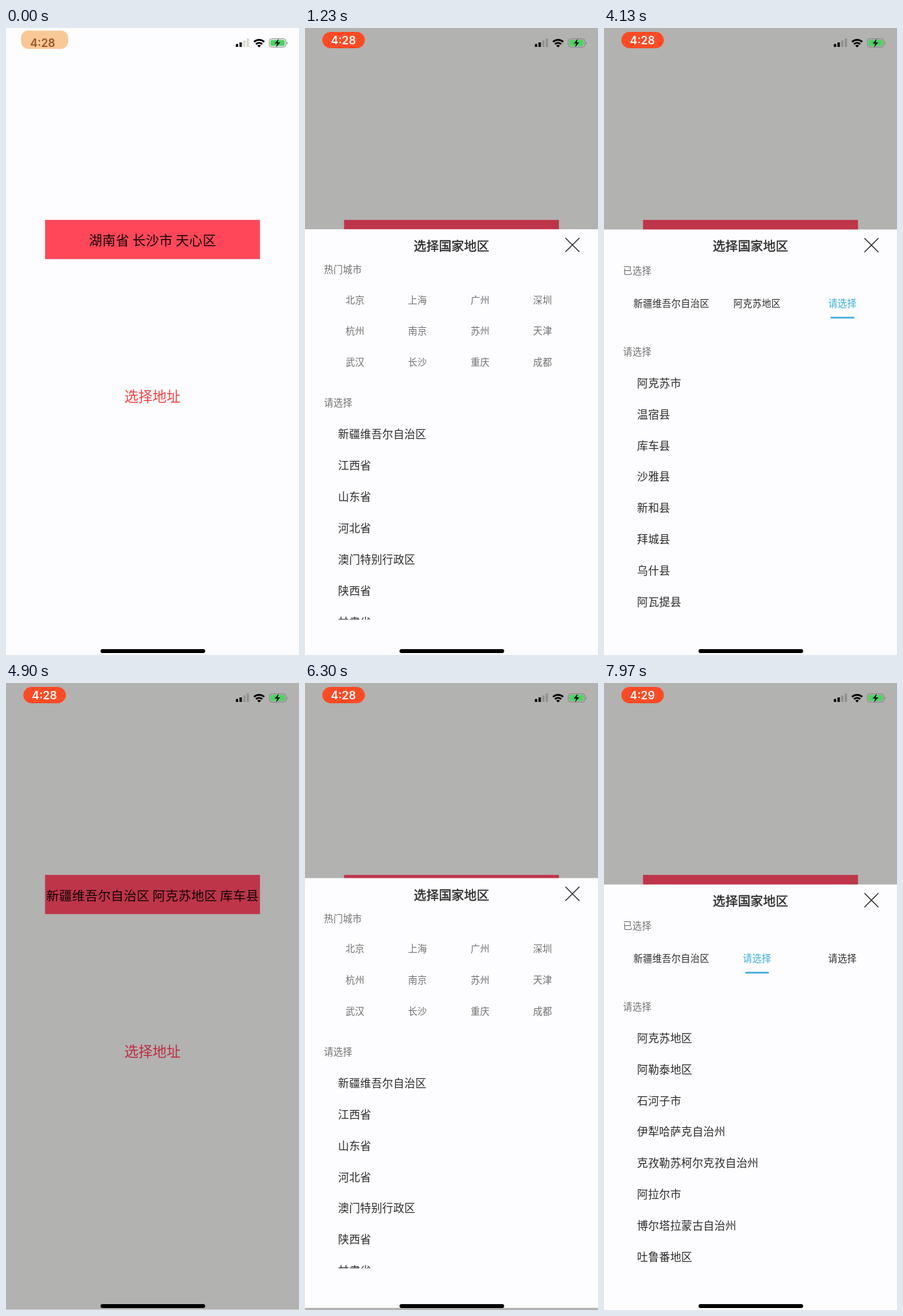
An HTML page for the animation above (8000 ms loop, 448 by 960 pixels).

```html
<!DOCTYPE html>
<html lang="zh-CN">
<head>
<meta charset="utf-8">
<title>选择地址</title>
<style>
  html, body { margin: 0; width: 100%; height: 100%; overflow: hidden; background: #fdfdff; }
  svg { display: block; width: 100vw; height: 100vh; }
  text { font-family: "Noto Sans CJK SC", "Noto Sans CJK", "Noto Sans", sans-serif; }
  #title text { stroke: #2b2b2b; stroke-width: 0.45; }
  #clock { font: 600 17px Inter, sans-serif; }
</style>
</head>
<body>
<svg viewBox="0 0 448 960" xmlns="http://www.w3.org/2000/svg">
  <defs><clipPath id="list"><rect y="309" width="448" height="597"/></clipPath></defs>
  <rect id="bg" width="448" height="960"/>
  <rect id="box" x="59.7" y="293.8" width="328.6" height="60"/>
  <g id="home"></g>
  <g id="sheet">
    <rect y="308.5" width="448" height="658" fill="#fdfdff"/>
    <path d="M398.2 321.8l21.4 21.4m0-21.4l-21.4 21.4" stroke="#2b2b2b" stroke-width="1.5"/>
    <g id="title"></g>
    <g id="provinces" clip-path="url(#list)"></g>
    <g id="cities"></g>
    <g id="districts"></g>
  </g>
  <rect id="pill"/>
  <text id="clock" text-anchor="middle"></text>
  <path d="M351.5 24.5h3.6v4.5h-3.6zM357 22h3.6v7h-3.6z"/>
  <path id="weak" d="M362.6 19h3.6v10h-3.6zM368 16h3.6v13h-3.6z"/>
  <g fill="none" stroke="#000" stroke-width="2.7">
    <path d="M379.2 21.3a11.2 11.2 0 0 1 15.6 0"/>
    <path d="M382.2 24.7a6.9 6.9 0 0 1 9.6 0"/>
  </g>
  <path d="M387 29.8l-2.8-2.8a4 4 0 0 1 5.6 0z"/>
  <rect x="402.5" y="16.5" width="25.5" height="12.8" rx="3.8" fill="none" stroke="#848484"/>
  <path d="M429.4 21v4a2.2 2.2 0 0 0 0-4z" fill="#848484"/>
  <rect x="404.2" y="18.2" width="22.1" height="9.4" rx="2.3" fill="#4bd363"/>
  <path d="M417 16.5l-6.2 7.2h3.8l-1.6 5.8 6.4-7.4h-3.9z"/>
  <rect x="144.5" y="951" width="160" height="6" rx="3"/>
</svg>
<script>
const $ = id => document.getElementById(id);
const LOOP = 8000, TRAVEL = 651;
const INK = '#2b2b2b', SOFT = '#707070', BLUE = '#37ace0';
const TABS = [103, 234, 364.5];

function add(parent, tag, attrs) {
  const el = document.createElementNS('http://www.w3.org/2000/svg', tag);
  set(el, attrs);
  $(parent).append(el);
  return el;
}

// Text placed by the centre height of its glyphs
function label(parent, str, x, cy, size, opt = {}) {
  const el = add(parent, 'text', {
    x, y: cy + size * 0.385, 'font-size': size, fill: opt.fill || INK,
    'text-anchor': opt.anchor || 'start', 'letter-spacing': opt.gap ?? 0.16
  });
  el.textContent = str;
  return el;
}

const small = (parent, str, cy) => label(parent, str, 29, cy, 14.34, { fill: SOFT });
const rows = (parent, names, top) =>
  names.split(' ').forEach((n, i) => label(parent, n, 50.5, top + i * 47.86, 16.73));

function picked(parent, tabs, active, names) {
  small(parent, '已选择', 371);
  tabs.forEach((tab, i) => label(parent, tab, TABS[i], 421.5, 14.34,
    { anchor: 'middle', fill: i === active ? BLUE : INK }));
  add(parent, 'path', {
    d: `M${TABS[active] - 17} 443.5h34`, stroke: BLUE, 'stroke-width': 2.4, 'stroke-linecap': 'round'
  });
  small(parent, '请选择', 495);
  rows(parent, names, 543.4);
}

const clamp = v => Math.min(1, Math.max(0, v));
const ease = p => p * p * (3 - 2 * p);
const mix = (a, b, p) => a + (b - a) * p;
const rgb = (a, b, p) => `rgb(${a.map((v, i) => Math.round(mix(v, b[i], p)))})`;
const show = (el, on) => { el.style.display = on ? '' : 'none'; };
function set(el, attrs) { for (const k in attrs) el.setAttribute(k, attrs[k]); }

const before = label('home', '湖南省 长沙市 天心区', 224, 325, 20.3, { anchor: 'middle', gap: 0.25, fill: '#140606' });
const after = label('home', '新疆维吾尔自治区 阿克苏地区 库车县', 224, 325.5, 19.6, { anchor: 'middle', gap: 0.15, fill: '#100505' });
const link = label('home', '选择地址', 224, 564, 21.5, { anchor: 'middle', gap: 0 });

label('title', '选择国家地区', 224, 334, 19.12, { anchor: 'middle' });
small('provinces', '热门城市', 370);
'北京 上海 广州 深圳 杭州 南京 苏州 天津 武汉 长沙 重庆 成都'.split(' ').forEach((n, i) =>
  label('provinces', n, 76.5 + (i % 4) * 95.6, 416.5 + Math.floor(i / 4) * 47.8, 14.34, { anchor: 'middle', fill: SOFT }));
small('provinces', '请选择', 574);
rows('provinces', '新疆维吾尔自治区 江西省 山东省 河北省 澳门特别行政区 陕西省 甘肃省', 622.4);
picked('cities', ['新疆维吾尔自治区', '请选择', '请选择'], 1,
  '阿克苏地区 阿勒泰地区 石河子市 伊犁哈萨克自治州 克孜勒苏柯尔克孜自治州 阿拉尔市 博尔塔拉蒙古自治州 吐鲁番地区');
picked('districts', ['新疆维吾尔自治区', '阿克苏地区', '请选择'], 2,
  '阿克苏市 温宿县 库车县 沙雅县 新和县 拜城县 乌什县 阿瓦提县');

// Timeline in ms
const visits = [
  { dim: 640, open: 730, city: 2250, district: 3700, close: 4500, end: 4950 },
  { dim: 5890, open: 5994, city: 7700, district: Infinity, close: Infinity, end: Infinity }
];

// Underdamped spring, remaining distance 1 -> 0
function spring(ms) {
  if (ms <= 0) return 1;
  const t = ms / 1000, decay = 14, w = 10.5;
  return Math.exp(-decay * t) * (Math.cos(w * t) + decay / w * Math.sin(w * t));
}

function draw(t) {
  const v = visits.find(s => t >= s.dim && t < s.end);
  set($('bg'), { fill: v ? '#b2b2b1' : '#fdfdff' });
  set($('box'), { fill: v ? '#be3549' : '#ff4759' });
  set(link, { fill: v ? '#bd2b40' : '#f93f40' });
  set($('weak'), { fill: v ? '#92928e' : '#d8d8cc' });
  show(before, t < visits[0].close);
  show(after, t >= visits[0].close);

  show($('sheet'), v);
  if (v) {
    const shift = t < v.close ? spring(t - v.open) : ease(clamp((t - v.close) / 350));
    set($('sheet'), { transform: `translate(0 ${(shift * TRAVEL).toFixed(2)})` });
    show($('provinces'), t < v.city);
    show($('cities'), t >= v.city && t < v.district);
    show($('districts'), t >= v.district);
  }

  const p = ease(clamp(t / 350));
  set($('pill'), {
    x: mix(23, 26.5, p), y: mix(4, 6, p), width: mix(72, 65, p), height: mix(28, 25, p),
    rx: mix(11, 12.5, p), fill: rgb([249, 200, 150], [252, 75, 36], p)
  });
  set($('clock'), { x: mix(56, 58.7, p), y: mix(29, 24.6, p), fill: rgb([155, 82, 42], [255, 255, 255], p) });
  $('clock').textContent = t < 7200 ? '4:28' : '4:29';
}

const start = performance.now();
function tick() {
  draw((performance.now() - start) % LOOP);
  requestAnimationFrame(tick);
}
tick();
</script>
</body>
</html>
```
